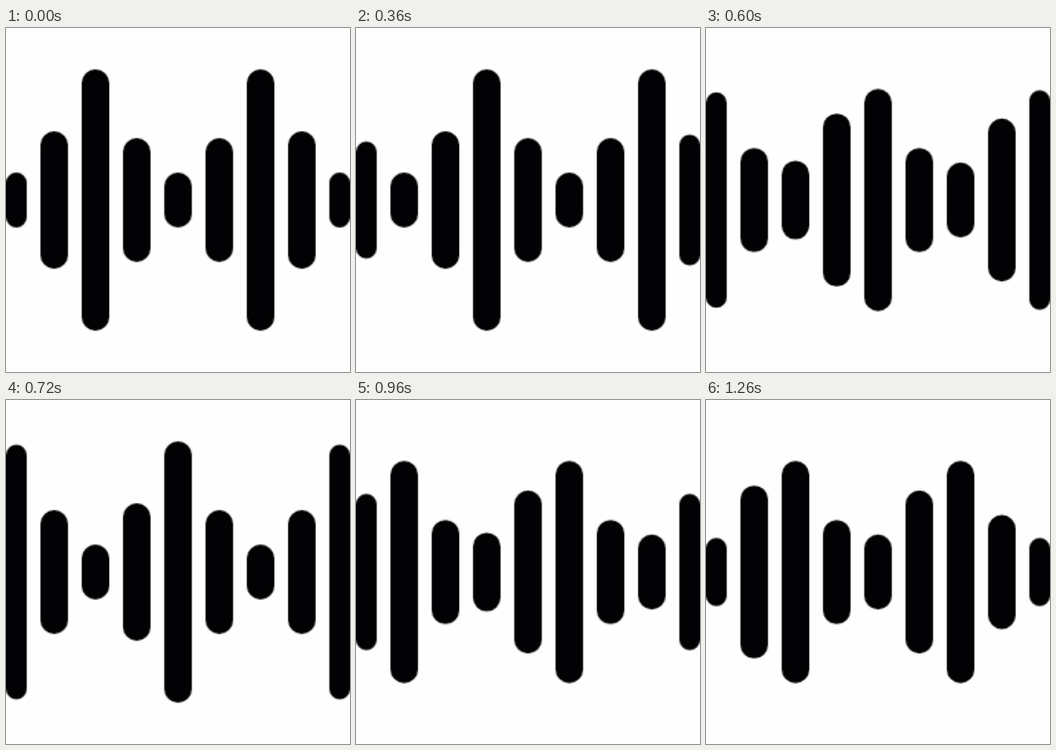
Write an HTML page with a canvas that moves like this. It is 498 px wide and 498 px high and loops after 1.32 s.

```html
<!DOCTYPE html>
<html lang="en">
<head>
<meta charset="utf-8">
<title>Sound wave</title>
<style>
  html, body { margin: 0; width: 100%; height: 100%; overflow: hidden; background: #fefefe; }
  canvas { display: block; }
</style>
</head>
<body>
<canvas id="stage" width="498" height="498"></canvas>
<script>
const LOOP = 1320, TICK = 60, STEPS_PER_BEAT = 7;
const STAGE = 498, SIZE = 500, GAP = 20;
const LAST = 8, MIDDLE = LAST / 2, PERIOD = 4;

const ctx = document.getElementById('stage').getContext('2d');
ctx.imageSmoothingEnabled = true;

// Bars are drawn at half size and enlarged, which softens their edges.
const small = document.createElement('canvas');
small.width = small.height = SIZE / 2;
const pen = small.getContext('2d');
pen.scale(0.5, 0.5);

const isEdge = bar => bar === 0 || bar === LAST;

// Half height of a bar on a whole beat: a wave moving one bar right per beat.
function heightOnBeat(bar, beat) {
  const offset = bar - beat % PERIOD;
  const rise = 2 - Math.abs((offset & 3) - 2);
  const swell = Math.abs(offset - MIDDLE) === 3 && bar !== MIDDLE ? 10 : 0;
  const trim = isEdge(bar) && beat > 0 ? 5 : 0;
  return 40 + 25 * rise * (rise + 1) + swell - trim;
}

function heightAt(bar, phase) {
  const beat = Math.floor(phase);
  const from = heightOnBeat(bar, beat);
  return from + (heightOnBeat(bar, beat + 1) - from) * (phase - beat);
}

function draw(time) {
  const tick = Math.floor((time % LOOP) / TICK);
  // Every fifth step is skipped.
  const phase = Math.floor(tick * 1.24) / STEPS_PER_BEAT;

  pen.fillStyle = '#fefefe';
  pen.fillRect(0, 0, SIZE, SIZE);
  pen.fillStyle = '#020103';
  pen.beginPath();
  for (let bar = 0, x = 0; bar <= LAST; bar++) {
    const width = isEdge(bar) ? 30 : 40;
    const half = heightAt(bar, phase);
    pen.roundRect(x, SIZE / 2 - half, width, half * 2, width / 2);
    x += width + GAP;
  }
  pen.fill();
  ctx.drawImage(small, 0, 0, STAGE, STAGE);
}

const start = performance.now();
function loop() {
  draw(performance.now() - start);
  requestAnimationFrame(loop);
}
loop();
</script>
</body>
</html>
```
